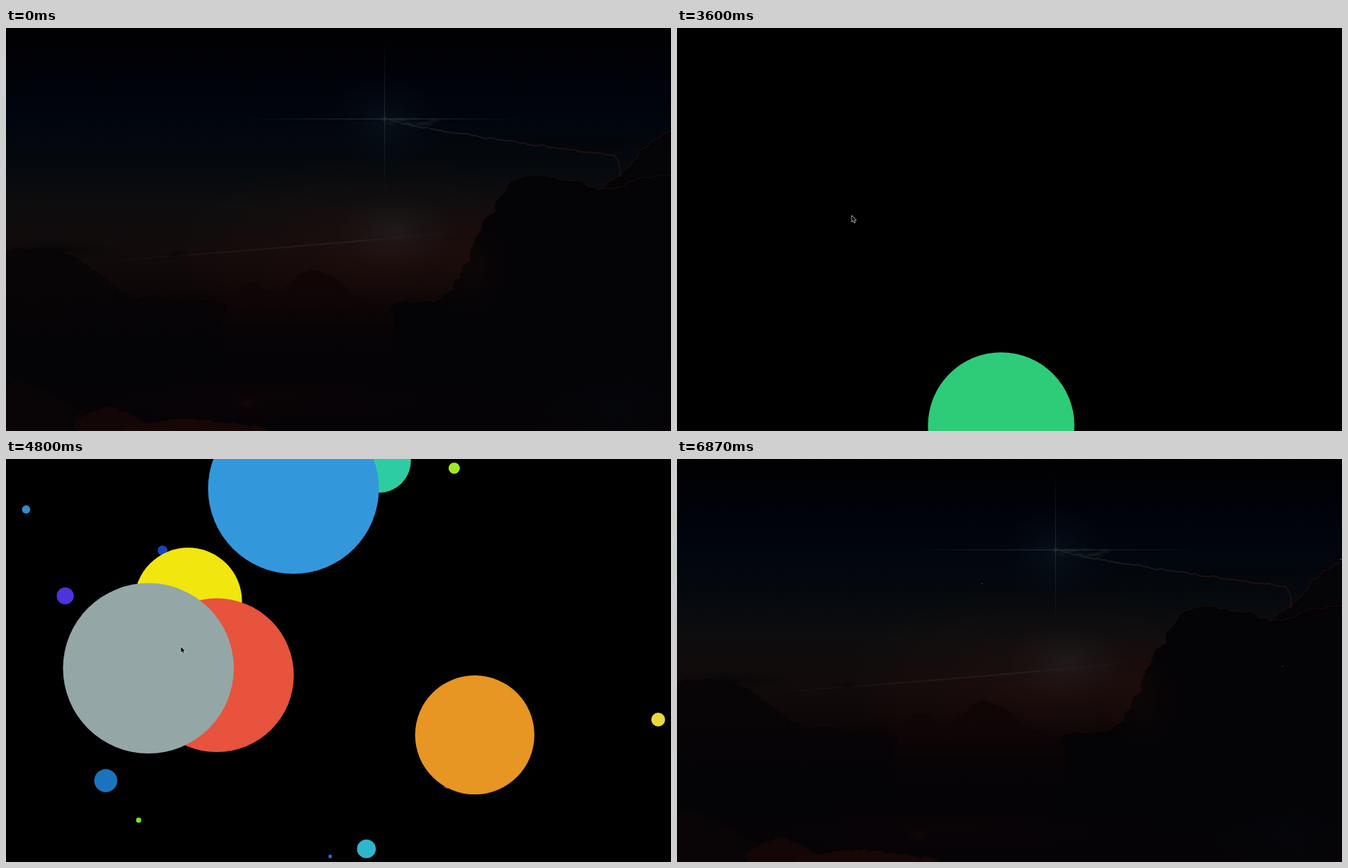
Write an HTML page with a canvas that moves like this. It is 960x583 px and loops after 6.94 s.

```html
<!DOCTYPE html>
<html lang="en">
<head>
<meta charset="utf-8">
<title>Shrinking circles</title>
<style>
  html, body { margin: 0; height: 100%; overflow: hidden; background: #000; }
  canvas { display: block; }
</style>
</head>
<body>
<canvas id="stage" width="960" height="583"></canvas>
<script>
const W = 960, H = 583, LOOP = 6940, FRAME = 200 / 3;
const START_RADIUS = 123.3, SHRINK = 0.95;
const ctx = document.getElementById('stage').getContext('2d');

// hue, saturation, lightness
const green = [145, 63, 49], orange = [28, 80, 52], blue = [204, 70, 53], teal = [168, 76, 42],
      red = [6, 78, 57], yellow = [48, 89, 50], grey = [184, 9, 62];

// One key press each: time in 1/60 s, x, y, colour
const circles = [
  [213, 468, 575, green], [220, 191.5, 522.5, orange], [227, 637, 471.5, blue],
  [229, 29, 73, green], [232, 226, 132.3, teal], [235, 647, 13.3, orange],
  [239, 941.5, 377, red], [243, 85.5, 198, blue], [245, 520.3, 564, green],
  [249, 144, 465.3, teal], [260, 256.2, 299.3, yellow], [269, 538, 2.3, green],
  [279, 263, 206, yellow], [281, 676.7, 399.2, orange], [286, 304.2, 312.8, red],
  [288, 415, 42.8, blue], [288, 205.6, 302.8, grey], [291, 763.7, 319, green],
  [304, 874.2, 300, yellow], [308, 440.5, 180, orange], [312, 958.2, 145, grey]
];

const clamp = v => Math.max(0, Math.min(1, v));
const smooth = (from, to, x) => {
  const p = clamp((x - from) / (to - from));
  return p * p * (3 - 2 * p);
};
const bump = (center, width, x) => Math.exp(-(((x - center) / width) ** 2));

function randomizer(seed) {
  return () => (seed = seed * 16807 % 2147483647) / 2147483647;
}

function paintSky() {
  const canvas = document.createElement('canvas');
  canvas.width = W;
  canvas.height = H;
  const g = canvas.getContext('2d');
  const random = randomizer(71);

  function fade(gradient, ...colors) {
    colors.forEach((color, i) => gradient.addColorStop(i / (colors.length - 1), color));
    return gradient;
  }

  function glow(x, y, rx, ry, rgb, alpha) {
    g.save();
    g.translate(x, y);
    g.scale(rx, ry);
    g.fillStyle = fade(g.createRadialGradient(0, 0, 0, 0, 0, 1),
      `rgba(${rgb},${alpha})`, `rgba(${rgb},${alpha * 0.4})`, `rgba(${rgb},0)`);
    g.fillRect(-1, -1, 2, 2);
    g.restore();
  }

  // Puffs along a ridge with a lit rim; everything below the ridge is filled.
  function cloud(from, to, ridge, size, rim, body) {
    const puffs = [];
    for (let x = from; x <= to; x += size / 3) {
      puffs.push([x, ridge(x) + size, size * (0.5 + 0.7 * random())]);
    }
    [[rim, 0], [body, 1]].forEach(([color, shift]) => {
      g.fillStyle = color;
      puffs.forEach(([x, y, r]) => {
        g.beginPath();
        g.arc(x + shift, y + shift, r, 0, 7);
        g.fill();
      });
    });
    g.beginPath();
    g.moveTo(from, H);
    puffs.forEach(([x, y]) => g.lineTo(x, y));
    g.lineTo(to, H);
    g.fill();
  }

  g.fillStyle = fade(g.createLinearGradient(0, 0, 0, H), '#010102', '#010209', '#01050d',
    '#05090e', '#0e0d0e', '#120b0b', '#0e0606', '#060407', '#040307', '#050306');
  g.fillRect(0, 0, W, H);
  glow(546, 135, 75, 65, '14,34,44', 0.35);
  glow(540, 320, 300, 130, '60,24,18', 0.28);
  glow(560, 295, 85, 55, '42,46,48', 0.35);

  g.strokeStyle = fade(g.createLinearGradient(130, 0, 690, 0), '#1c151300', '#1e1615', '#202021', '#20141300');
  g.lineWidth = 2;
  g.beginPath();
  g.moveTo(130, 338);
  g.quadraticCurveTo(420, 318, 690, 291);
  g.stroke();

  // middle and left-hand clouds, with a flat dark top
  cloud(310, 680, x => 396 - 26 * bump(350, 30, x) - 46 * bump(445, 45, x) - 18 * smooth(600, 680, x),
    10, '#170807', '#110606');
  glow(245, 328, 22, 8, '10,6,6', 0.8);
  cloud(0, 312, x => 318 + 68 * smooth(60, 190, x) + 8 * smooth(190, 310, x), 10, '#180b08', '#080506');
  glow(70, 321, 105, 16, '7,5,6', 0.9);

  // trail and the large cloud on the right
  glow(830, 164, 200, 18, '3,4,7', 0.85);
  g.strokeStyle = fade(g.createLinearGradient(548, 0, 895, 0), '#1c2726', '#211c18', '#25130c', '#28110a');
  g.lineWidth = 1.5;
  g.beginPath();
  for (let x = 548; x < 882; x += 5) {
    g.lineTo(x, 131 + 54 * ((x - 548) / 334) ** 0.8 + 3 * random() - 1.5);
  }
  g.quadraticCurveTo(898, 210, 872, 232);
  g.stroke();
  for (let i = 0; i < 14; i++) {
    glow(555 + i * 5, 131 + 10 * random(), 10, 4, '34,46,46', 0.35);
  }
  cloud(872, W, x => 222 - 72 * smooth(865, 960, x), 9, '#1f0d08', '#050407');
  cloud(560, W, x => 394 - 180 * smooth(620, 750, x) + 20 * bump(865, 40, x), 12, '#1c0b08', '#040306');
  glow(665, 293, 20, 13, '28,10,8', 0.8);
  glow(670, 345, 60, 90, '40,14,9', 0.28);

  // haze over the lower half and foreground clouds
  g.fillStyle = fade(g.createLinearGradient(0, 370, 0, H), '#04030600', '#040306c0', '#040306', '#060306');
  g.fillRect(0, 370, W, H - 370);
  glow(380, 535, 330, 40, '24,5,7', 0.3);
  glow(880, 545, 130, 80, '5,8,13', 0.6);
  cloud(0, 110, x => 512 + 40 * smooth(30, 110, x), 12, '#0a0506', '#090506');
  cloud(108, 210, x => 576 - 28 * bump(150, 40, x), 9, '#150806', '#120606');
  cloud(180, 370, x => 580 - 14 * bump(265, 80, x), 8, '#1c0907', '#180707');
  glow(348, 543, 16, 11, '22,9,9', 0.7);

  // star flare
  g.fillStyle = fade(g.createLinearGradient(340, 0, 752, 0), '#30363400', '#303634', '#30363400');
  g.fillRect(340, 131, 412, 1);
  g.fillStyle = fade(g.createLinearGradient(0, 20, 0, 242), '#242c2e00', '#242c2e', '#242c2e00');
  g.fillRect(546, 20, 1, 222);
  glow(546.5, 131.5, 5, 5, '50,60,58', 0.6);
  return canvas;
}

const sky = paintSky();
const cursor = new Path2D('M0 0V9.6L2.2 7.6 3.7 11 5.3 10.3 3.9 7.1H6.8Z');

function skyLevel(frame) {
  return frame < 50 ? clamp((10 - frame) / 5) : clamp((frame - 98) / 5);
}

function drawCursor(x, y) {
  ctx.save();
  ctx.translate(x, y);
  ctx.fillStyle = '#000';
  ctx.fill(cursor);
  ctx.strokeStyle = '#d8d8d8';
  ctx.lineWidth = 0.75;
  ctx.stroke(cursor);
  ctx.restore();
}

function render(time) {
  const frame = Math.floor((time + 4) / FRAME);
  const level = skyLevel(frame);

  ctx.fillStyle = '#000';
  ctx.fillRect(0, 0, W, H);
  ctx.globalAlpha = level;
  ctx.drawImage(sky, 0, 0);
  ctx.globalAlpha = 1;

  for (const [birth, x, y, [hue, sat, light]] of circles) {
    const age = frame * 4 - birth;
    if (age < 0) continue;
    ctx.fillStyle = `hsl(${hue + age}, ${sat}%, ${light}%)`;
    ctx.beginPath();
    ctx.arc(x, y, START_RADIUS * SHRINK ** age, 0, 2 * Math.PI);
    ctx.fill();
  }

  if (level === 0) {
    const moved = clamp((frame - 35) / 2) ** 0.45;
    drawCursor(244 + 8.2 * moved, 268 + 3 * moved);
  }
}

const start = performance.now();
function tick() {
  render((performance.now() - start) % LOOP);
  requestAnimationFrame(tick);
}
tick();
</script>
</body>
</html>
```
